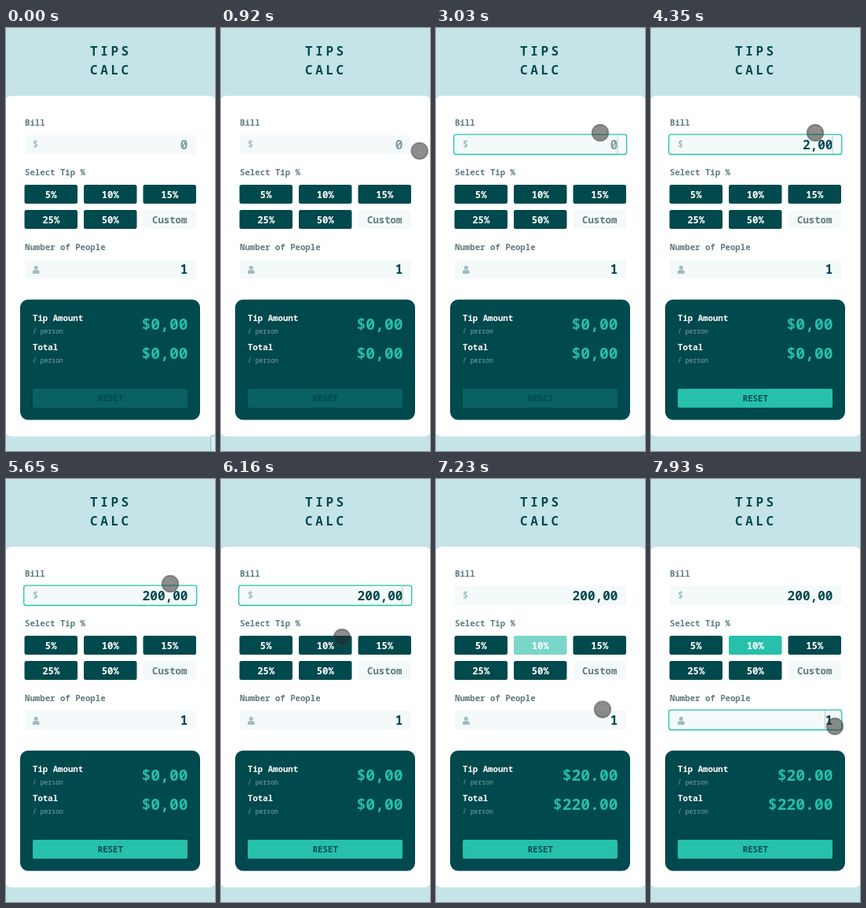
These frames come from a looping animation (266x537 px, 8 s). An HTML page with a canvas:

```html
<!DOCTYPE html>
<html lang="en">
<head>
<meta charset="utf-8">
<title>Tips calculator</title>
<style>
html, body { margin: 0; width: 100%; height: 100%; overflow: hidden; background: #c5e4e7; }
canvas { display: block; width: 266px; height: 537px; }
</style>
</head>
<body>
<canvas id="stage"></canvas>
<script>
const W = 266, H = 537, LOOP = 8000;
const canvas = document.getElementById('stage');
const ctx = canvas.getContext('2d');
const dpr = window.devicePixelRatio || 1;
canvas.width = W * dpr;
canvas.height = H * dpr;

const DARK = [0, 73, 77], GREEN = [38, 192, 171], HOVER = [122, 214, 200], DISABLED = [9, 97, 99];
const INK = '#00494d', TEAL = '#26c0ab', LABEL = '#5e7a7d', FIELD = '#f4f9f9', WHITE = '#fff';
const FOCUS = 1080, TAP = 6400, TAP_PEOPLE = 7640;

// [time, x, y]
const pointerPath = [
  [640, 278, 168], [1080, 242, 151], [1420, 234, 147], [1530, 234, 147],
  [1650, 231, 142], [1900, 209, 133], [5980, 209, 133], [6160, 154, 201],
  [6300, 145, 220], [6460, 145, 220], [6750, 163, 262], [7100, 201, 286],
  [7420, 231, 304], [7590, 231, 304], [7930, 234, 314]
];
const billTyping = [
  [3540, '2'], [3770, '20'], [4250, '200'], [4350, '2,00'],
  [4920, '2,000'], [4990, '20,00'], [5080, '20,000'], [5150, '200,00']
];
const caretToggles = [FOCUS, 1570, 2060, 2550, 3030, 4850, 4920, 5650, 6150];

const progress = (t, from, to) => Math.max(0, Math.min(1, (t - from) / (to - from)));
const ease = p => p * p * (3 - 2 * p);
const mix = (a, b, p) => `rgb(${a.map((v, i) => Math.round(v + (b[i] - v) * p))})`;

function box(x, y, w, h, r, fill) {
  ctx.beginPath();
  ctx.roundRect(x, y, w, h, r);
  ctx.fillStyle = fill;
  ctx.fill();
}

function text(str, x, y, size, color, align = 'left', weight = 700) {
  ctx.font = `${weight} ${size}px "Noto Sans Mono", "DejaVu Sans Mono", monospace`;
  ctx.textAlign = align;
  ctx.fillStyle = color;
  ctx.fillText(str, x, y);
}

function field(y, focused) {
  box(24, y, 218, 24, 2, FIELD);
  if (!focused) return;
  ctx.beginPath();
  ctx.roundRect(22.7, y - 0.8, 220, 25.3, 3);
  ctx.strokeStyle = TEAL;
  ctx.lineWidth = 1.3;
  ctx.stroke();
}

function caret(x, y) {
  ctx.fillStyle = '#b9cbcc';
  ctx.fillRect(x, y, 1, 24);
}

function button(label, col, row, fill, color = WHITE) {
  const x = 23.5 + col * 75.5, y = 199 + row * 32;
  box(x, y, 67.5, 24, 2.5, fill);
  text(label, x + 33.7, y + 16.7, 12.3, color, 'center');
}

function drawHeader() {
  ctx.letterSpacing = '3.6px';
  text('TIPS', 107, 35, 16, INK, 'left', 600);
  text('CALC', 107, 59, 16, INK, 'left', 600);
  ctx.letterSpacing = '0px';
}

function drawBill(t) {
  const focused = t >= FOCUS && t < TAP;
  const typed = billTyping.filter(([time]) => t >= time).pop();
  text('Bill', 24, 124, 10.7, LABEL, 'left', 600);
  field(136, focused);
  text('$', 34, 152, 11.5, '#9ebbbd', 'left', 600);
  text(typed ? typed[1] : '0', 231.5, 154, 16.1, typed ? INK : '#7f9c9f', 'right');
  if (focused && caretToggles.filter(time => t >= time).length % 2) caret(230.5, 136);
}

function drawTips(t) {
  text('Select Tip %', 24, 187, 10.7, LABEL, 'left', 600);
  const chosen = t < TAP_PEOPLE
    ? mix(DARK, HOVER, progress(t, TAP, TAP + 300))
    : mix(HOVER, GREEN, progress(t, TAP_PEOPLE, TAP_PEOPLE + 280));
  ['5%', '10%', '15%', '25%', '50%'].forEach((label, i) =>
    button(label, i % 3, Math.floor(i / 3), i === 1 ? chosen : INK));
  button('Custom', 2, 1, FIELD, LABEL);
}

function drawPeople(t) {
  const focused = t >= TAP_PEOPLE;
  text('Number of People', 24, 282, 10.7, LABEL, 'left', 600);
  field(294, focused);
  ctx.beginPath();
  ctx.arc(38.3, 304.3, 2.5, 0, Math.PI * 2);
  ctx.fillStyle = '#9ebbbd';
  ctx.fill();
  box(34, 307.2, 8.6, 4.8, [2, 2, 0.5, 0.5], '#9ebbbd');
  text('1', 231.5, 312, 16.1, INK, 'right');
  if (focused) caret(221, 294);
}

function drawResults(t) {
  const done = t >= TAP;
  box(18, 344.7, 229, 152.8, 10, INK);
  [['Tip Amount', done ? '$20.00' : '$0,00'], ['Total', done ? '$220.00' : '$0,00']]
    .forEach(([label, amount], i) => {
      const y = 372 + i * 37;
      text(label, 34, y, 10.7, WHITE);
      text('/ person', 34, y + 16, 8.1, '#7fa5a6', 'left', 400);
      text(amount, 231.5, y + 11.3, 19.7, TEAL, 'right');
    });
  box(34, 458, 197, 24, 2, mix(DISABLED, GREEN, progress(t, 3770, 4040)));
  text('RESET', 132.8, 474, 10.7, INK, 'center');
}

function drawCorner(t) {
  if (t >= 60) return;
  const shift = t < 30 ? 0 : 3;
  box(260.5 + shift, 517.5 + shift, 10, 24, 1, '#d5ecf0');
  ctx.strokeStyle = '#94bfcd';
  ctx.lineWidth = 1;
  ctx.stroke();
}

function drawPointer(t) {
  if (t < pointerPath[0][0]) return;
  const i = pointerPath.findLastIndex(([time]) => t >= time);
  const a = pointerPath[i], b = pointerPath[i + 1] || a;
  const p = a === b ? 0 : ease(progress(t, a[0], b[0]));
  const x = a[1] + (b[1] - a[1]) * p, y = a[2] + (b[2] - a[2]) * p;
  ctx.beginPath();
  ctx.arc(x, y, 10.4, 0, Math.PI * 2);
  ctx.fillStyle = 'rgba(40, 40, 40, 0.53)';
  ctx.fill();
  ctx.strokeStyle = 'rgba(70, 70, 70, 0.5)';
  ctx.lineWidth = 1.8;
  ctx.stroke();
}

function draw(t) {
  ctx.setTransform(dpr, 0, 0, dpr, 0, 0);
  ctx.fillStyle = '#c5e4e7';
  ctx.fillRect(0, 0, W, H);
  drawHeader();
  box(-2, 86, 270, 432.5, 9, WHITE);
  drawBill(t);
  drawTips(t);
  drawPeople(t);
  drawResults(t);
  drawCorner(t);
  drawPointer(t);
}

const start = performance.now();
function tick() {
  draw((performance.now() - start) % LOOP);
  requestAnimationFrame(tick);
}
tick();
</script>
</body>
</html>
```
